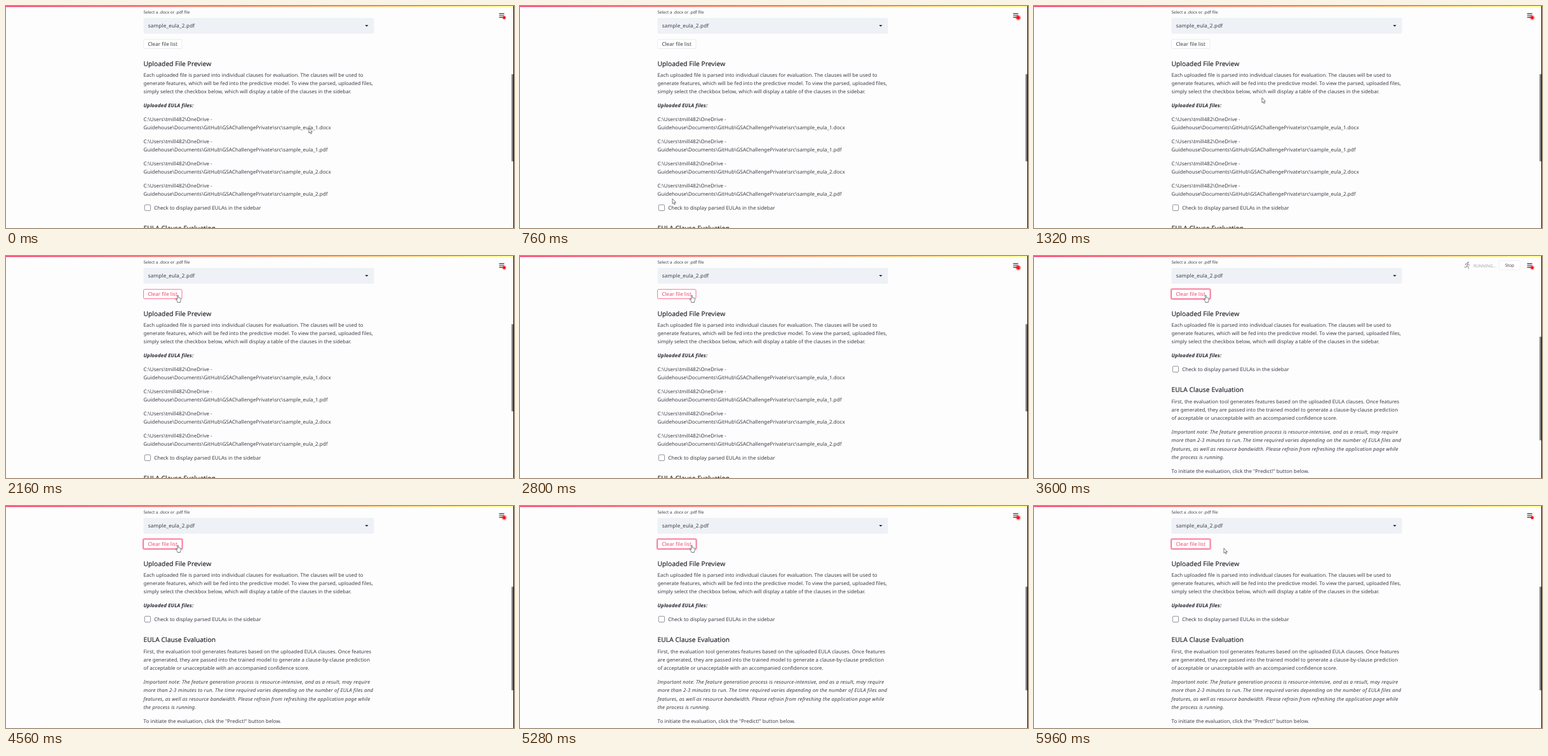
These frames come from a looping animation (800x351 px, 6 s). An HTML page:

```html
<!DOCTYPE html>
<html lang="en">
<head>
<meta charset="utf-8">
<title>Uploaded File Preview</title>
<style>
html, body { margin: 0; width: 100%; height: 100%; overflow: hidden; background: #fefdfe; }
svg { display: block; width: 100vw; height: 100vh; }
text { font-family: "Noto Sans", "Open Sans", sans-serif; font-size: 7.96px; fill: #3c3d46; text-rendering: geometricPrecision; }
.ui { font-size: 8.02px; }
.field { font-size: 8.12px; letter-spacing: .17px; }
.button { font-size: 8.12px; }
.label { font-size: 6.4px; }
.head { font-size: 10.3px; letter-spacing: .03px; fill: #262730; stroke: #262730; stroke-width: .16px; }
.strong { font-size: 7.9px; letter-spacing: .12px; font-weight: 700; font-style: italic; fill: #262730; }
.note { font-size: 7.96px; letter-spacing: .14px; font-style: italic; }
.status { font-size: 6.55px; fill: #a0a1a8; }
.line { fill: none; stroke: #85868e; stroke-width: 1; stroke-linecap: round; stroke-linejoin: round; }
</style>
</head>
<body>
<svg viewBox="0 0 800 351" preserveAspectRatio="none">
  <defs>
    <linearGradient id="bar"><stop stop-color="#f63366"/><stop offset="1" stop-color="#fffd80"/></linearGradient>
    <radialGradient id="halo"><stop offset=".35" stop-color="#f00"/><stop offset=".6" stop-color="#f00" stop-opacity=".5"/><stop offset="1" stop-color="#f00" stop-opacity="0"/></radialGradient>
  </defs>
  <rect width="800" height="351" fill="#fefdfe"/>
  <rect x="216.5" y="18.7" width="363" height="25" rx="2" fill="#eef1f5"/>
  <path d="M565.4 30h5.2l-2.6 2.8z" fill="#262730"/>
  <rect id="ring" x="215.6" y="51.8" width="62.5" height="16.7" rx="2.4" fill="none" stroke="#f63366" stroke-opacity=".5" stroke-width="1.6"/>
  <rect id="button" x="216.6" y="52.8" width="60.5" height="14.7" rx="1.8" fill="#fff" stroke-width=".7"/>
  <g id="top"></g>
  <g id="files"></g>
  <g id="lower">
    <rect x="218.3" y="174.3" width="9.3" height="9.3" rx="1.6" fill="#fff" stroke="#85868f" stroke-width=".9"/>
  </g>
  <g id="running">
    <g id="wheel">
      <circle cx="684.8" cy="11.2" r="1.1" fill="#85868e"/>
      <path class="line" d="M680 11.6l2.6 1.1-1.2 2.7 3.1.3.6 3.3 1.5.1M682.6 12.7l2.3 1.6"/>
      <path class="line" d="M680.4 14.2a2.9 2.9 0 1 0 3.3 4.1"/>
    </g>
    <g id="runner">
      <circle cx="683.6" cy="10.2" r="1.1" fill="#85868e"/>
      <path class="line" d="M679.3 14.3l.5-1.9 3-.6.9 1.9 2.4.8M682.8 11.8l-1 3.7 2.2 1.5.2 3.1M681.8 15.5l-1 2.5-2.9-.5"/>
    </g>
    <rect x="732.4" y="7.4" width="33.2" height="14.5" rx="1.8" fill="#fff" stroke="#e5e5e9" stroke-width=".6"/>
    <text class="status" x="692" y="17.5">RUNNING...</text>
    <text class="label" x="742" y="17.3" style="font-size:6.6px">Stop</text>
  </g>
  <path d="M776.6 12.1h8M776.6 15h8M776.6 17.9h8" stroke="#262730" stroke-width="1.1"/>
  <circle id="glow" cx="784.6" cy="18.5" r="5.2" fill="url(#halo)"/>
  <circle cx="784.6" cy="18.5" r="2.4" fill="#f4121c"/>
  <rect width="800" height="1.5" fill="url(#bar)"/>
  <rect id="thumb" x="796.2" width="3" fill="#77787b"/>
  <rect x="799" width="1" height="351"/>
  <g id="cursor" stroke="#4d4d52" stroke-width=".75" fill="#fff" stroke-linejoin="round">
    <path id="arrow" d="M0 0v8l1.8-1.6 1.3 2.8 1.3-.6-1.3-2.7h2.5z"/>
    <path id="hand" d="M-.8.7q0-.9.8-.9t.8.9v3.1q.7-.5 1.4.2.7-.5 1.3.3.9-.4 1.3.6v2.4q0 1.5-.9 2.5v1.4h-4.4v-1.2l-2.5-3.3q-.3-1.1.7-1.1l1.5 1.2z"/>
  </g>
</svg>
<script>
const $ = id => document.getElementById(id);
const LOOP = 6000, STEP = 40, HOLD = 240;
const HOVER = 2000, CLICK = 2840, RUN = 2960, CLEARED = 3440, DONE = 3920;

function write(group, cls, x, y, ...lines) {
  lines.forEach((str, i) => {
    const el = document.createElementNS("http://www.w3.org/2000/svg", "text");
    el.setAttribute("class", cls);
    el.setAttribute("x", x);
    el.setAttribute("y", y + i * 13.2);
    el.textContent = str;
    $(group).append(el);
  });
  return $(group).lastChild;
}

write("top", "label", 216.6, 12.2, "Select a .docx or .pdf file");
write("top", "field", 223.7, 34, "sample_eula_2.pdf");
const caption = write("top", "button", 223.4, 63, "Clear file list");
write("top", "head", 216.4, 94.5, "Uploaded File Preview");
write("top", "body", 216.6, 112,
  "Each uploaded file is parsed into individual clauses for evaluation. The clauses will be used to",
  "generate features, which will be fed into the predictive model. To view the parsed, uploaded files,",
  "simply select the checkbox below, which will display a table of the clauses in the sidebar.");
write("top", "strong", 216.5, 160, "Uploaded EULA files:");

["1.docx", "1.pdf", "2.docx", "2.pdf"].forEach((name, i) =>
  write("files", "ui", 216.6, 182 + i * 35,
    "C:\\Users\\tmill482\\OneDrive -",
    "Guidehouse\\Documents\\GitHub\\GSAChallengePrivate\\src\\sample_eula_" + name));

write("lower", "ui", 233.2, 181.6, "Check to display parsed EULAs in the sidebar");
write("lower", "head", 216.4, 215.2, "EULA Clause Evaluation");
write("lower", "body", 216.6, 232.8,
  "First, the evaluation tool generates features based on the uploaded EULA clauses. Once features",
  "are generated, they are passed into the trained model to generate a clause-by-clause prediction",
  "of acceptable or unacceptable with an accompanied confidence score.");
write("lower", "note", 216.6, 281.2,
  "Important note: The feature generation process is resource-intensive, and as a result, may require",
  "more than 2-3 minutes to run. The time required varies depending on the number of EULA files and",
  "features, as well as resource bandwidth. Please refrain from refreshing the application page while",
  "the process is running.");
write("lower", "body", 216.6, 342.8, "To initiate the evaluation, click the \"Predict!\" button below.");

// Pointer path: time, x, y
const path = [
  [200, 477, 193], [600, 224, 336], [840, 248, 289], [1320, 359, 145],
  [1480, 346, 95], [2000, 270.5, 62.2], [5400, 270.5, 62.2], [5760, 299, 66.6], [LOOP, 299, 66.6]
];

function pointer(t) {
  if (t <= path[0][0]) return path[0].slice(1);
  const i = path.findIndex(p => p[0] >= t);
  const [t0, x0, y0] = path[i - 1], [t1, x1, y1] = path[i];
  const k = (t - t0) / (t1 - t0);
  return [x0 + (x1 - x0) * k, y0 + (y1 - y0) * k];
}

const show = (id, on) => $(id).setAttribute("visibility", on ? "visible" : "hidden");
const set = (id, name, value) => $(id).setAttribute(name, value);

function draw(time) {
  let t = Math.floor(time % LOOP / STEP) * STEP;
  if (t < HOLD) t = 0;
  const [x, y] = pointer(t);
  const over = x < 277 && y > 53 && y < 68;
  const focus = t >= CLICK, cleared = t >= CLEARED;
  const active = focus || t >= HOVER;

  set("cursor", "transform", `translate(${x} ${y})`);
  show("arrow", !over);
  show("hand", over);
  show("ring", focus);
  set("button", "stroke", active ? "#f63366" : "#e2e2e6");
  caption.style.fill = active ? "#f0476f" : "";

  show("files", !cleared);
  set("lower", "transform", `translate(0 ${cleared ? 0 : 140})`);
  set("thumb", "y", cleared ? 127.6 : 107.8);
  set("thumb", "height", cleared ? 163.8 : 137.8);

  const run = t >= RUN && t < DONE;
  show("running", run);
  show("wheel", run && !cleared);
  show("runner", run && cleared);

  const phase = (t / 2000 + .05) % 1;
  set("glow", "opacity", 1 - Math.abs(2 * phase - 1));
}

const start = performance.now();
function tick() {
  draw(performance.now() - start);
  requestAnimationFrame(tick);
}
tick();
</script>
</body>
</html>
```
